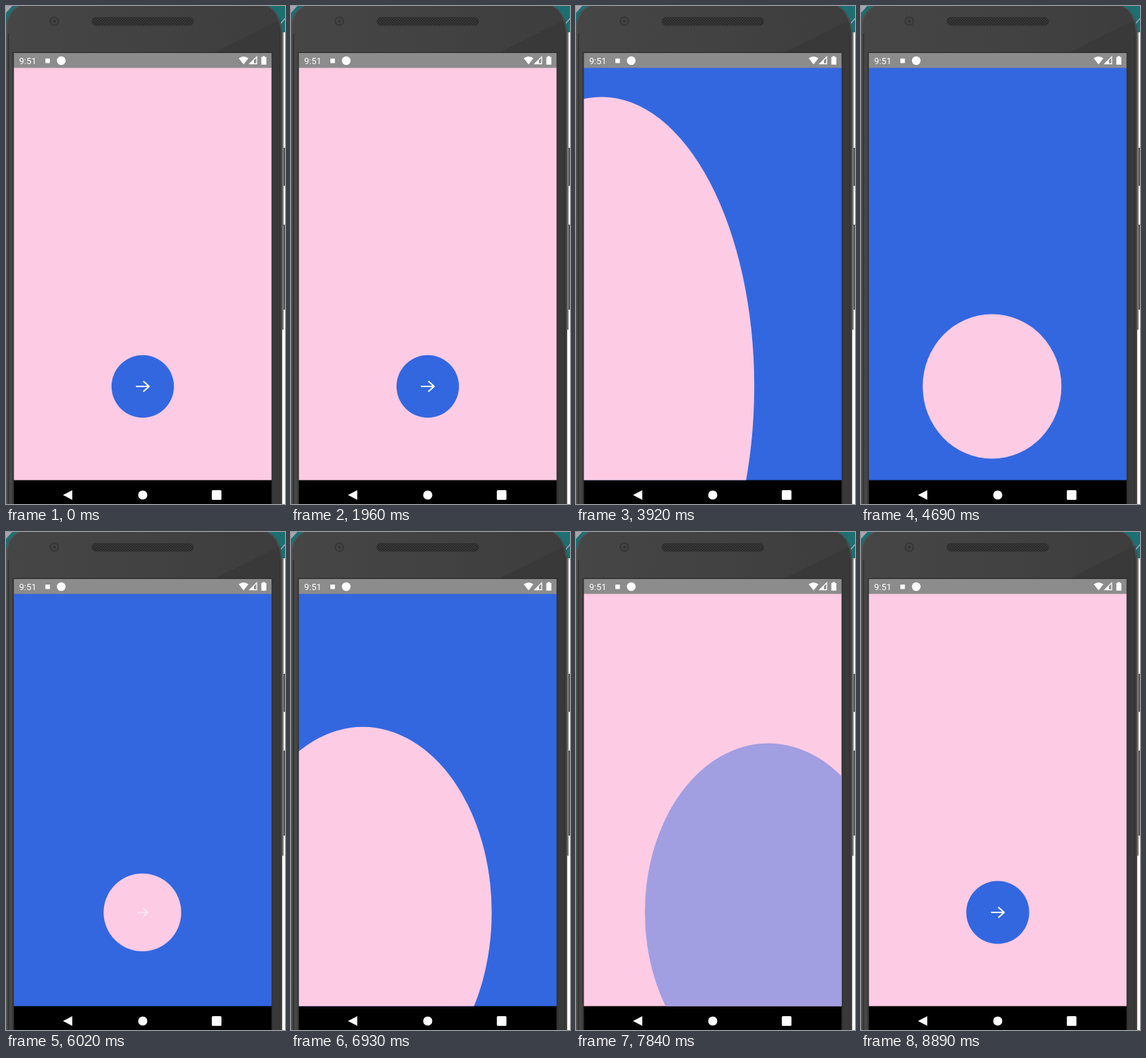
These frames come from a looping animation (404x720 px, 8.96 s). An HTML page:

```html
<!DOCTYPE html>
<html lang="en">
<head>
<meta charset="utf-8">
<title>Flip transition</title>
<style>
  html, body { margin: 0; width: 100%; height: 100%; overflow: hidden; background: #fff; }
  svg { display: block; width: 404px; height: 720px; }
  text { font: 13px Roboto, sans-serif; fill: #fff; }
</style>
</head>
<body>
<svg viewBox="0 0 404 720">
  <defs>
    <clipPath id="screen"><rect x="11.5" y="89.5" width="373" height="596"/></clipPath>
    <linearGradient id="body" x1="0" y1="0" x2="1" y2="0">
      <stop offset="0" stop-color="#464646"/>
      <stop offset=".5" stop-color="#424242"/>
      <stop offset="1" stop-color="#3d3d3d"/>
    </linearGradient>
    <pattern id="mesh" width="4" height="4" patternUnits="userSpaceOnUse">
      <rect width="4" height="4" fill="#383838"/>
      <circle cx="1" cy="1" r=".9" fill="#222"/>
      <circle cx="3" cy="3" r=".9" fill="#222"/>
    </pattern>
  </defs>

  <!-- desktop behind the phone -->
  <rect width="404" height="38" fill="#1d6f72"/>
  <path d="M398 25l6-7" stroke="#9aa5b5" stroke-width="1.5"/>
  <path d="M0 10L9 0H0z" fill="#a9a4ad"/>
  <path d="M401 205h3v55h-3zM401 316h3v123h-3z" fill="#565656"/>
  <path d="M400 38h2v430h-2z" fill="#7a7a7a"/>

  <!-- phone -->
  <path d="M0 720V26Q3 8 18 0H380Q397 8 400 38V720z" fill="url(#body)"/>
  <path d="M300 68L397 20L400 38V720H384V68z" fill="#393939"/>
  <path d="M1 720V26Q4 8 19 0M399 720V38Q396 8 379 0" fill="none" stroke="#5c5c5c"/>
  <path d="M3.5 720V40M396.5 720V40" stroke="#343434" stroke-width="2"/>
  <path d="M10.5 720V67.5H385.5V720" fill="none" stroke="#323232" stroke-width="2"/>
  <circle cx="70" cy="22" r="7" fill="#383838"/>
  <circle cx="70" cy="22" r="4.5" fill="#454648"/>
  <circle cx="70" cy="22" r="2.5" fill="#353739"/>
  <rect x="124.5" y="16.5" width="147" height="11.5" rx="5.5" fill="url(#mesh)" stroke="#303030"/>

  <!-- status bar -->
  <rect x="11.5" y="68" width="373" height="22" fill="#8c8c8c"/>
  <text x="19" y="84">9:51</text>
  <rect x="57" y="76" width="6.5" height="6.5" fill="#fff"/>
  <circle cx="80" cy="79" r="6.3" fill="#fff"/>
  <path d="M337 75.5Q344 70.5 351 75.5L344 84.5z" fill="#fff"/>
  <path d="M353 83.5L363 73.5V83.5z" fill="none" stroke="#fff" stroke-width="1.3"/>
  <path d="M352.5 84L359 77.5V84z" fill="#fff"/>
  <path d="M371.5 72.5h3.5v1.3h2v11h-7.3v-11h1.8z" fill="#fff"/>

  <!-- navigation bar -->
  <rect x="11.5" y="685" width="373" height="35" fill="#000"/>
  <path d="M82.5 707L96 700V714z" fill="#fff"/>
  <circle cx="198" cy="707" r="6.6" fill="#fff"/>
  <rect x="298" y="700" width="14" height="14" rx="1.5" fill="#fff"/>

  <!-- app -->
  <g clip-path="url(#screen)">
    <rect id="bg" x="11" y="89" width="374" height="598"/>
    <ellipse id="disc" cy="550"/>
    <path id="arrow" d="M-9.2 0H9M1.2-7L9 0L1.2 7" fill="none" stroke="#fff"
          stroke-width="2.1" stroke-linecap="round" stroke-linejoin="round"/>
  </g>
</svg>
<script>
const LOOP = 8960, STEP = 70;
const OUT = { start: 2080, span: 3200 }, BACK = { start: 5790, span: 3140 };
const CX = 198, CY = 550, RADIUS = 45.2, DEPTH = 367.5, GROWTH = 7;
const PINK = [253, 203, 228], BLUE = [51, 103, 224];
const [bg, disc, arrow] = ['bg', 'disc', 'arrow'].map(id => document.getElementById(id));

const clamp = v => Math.min(1, Math.max(0, v));
const mix = (a, b, k) => `rgb(${a.map((v, i) => Math.round(v + (b[i] - v) * k))})`;

// cubic-bezier(.42, 0, 1, 1), solved by bisection
function easeIn(x) {
  let lo = 0, hi = 1;
  for (let i = 0; i < 30; i++) {
    const u = (lo + hi) / 2, v = 1 - u;
    if (1.26 * u * v * v + 3 * u * u * v + u ** 3 < x) lo = u; else hi = u;
  }
  return lo * lo * (3 - 2 * lo);
}
const easeInOut = x => x < .5 ? easeIn(2 * x) / 2 : 1 - easeIn(2 - 2 * x) / 2;
const flip = (t, { start, span }) => easeInOut(clamp((t - start) / span));

function draw(t) {
  const p = flip(t, OUT) - flip(t, BACK);
  const late = p > .5;
  const angle = Math.PI * p;
  const scale = 1 + GROWTH * (1 - Math.abs(2 * p - 1));

  // a disc turned about its vertical axis, seen in perspective, is an ellipse
  const r = RADIUS * scale;
  const e = r * Math.sin(angle) / DEPTH;
  const w = r * Math.cos(angle) / (1 - e * e);
  disc.setAttribute('cx', CX + e * w);
  disc.setAttribute('rx', Math.abs(w));
  disc.setAttribute('ry', r / Math.sqrt(1 - e * e));
  disc.setAttribute('fill', mix(BLUE, PINK, clamp(2 * p)));
  bg.setAttribute('fill', mix(PINK, BLUE, late ? 1 : 0));

  const shown = clamp(1 - 20 * Math.min(p, 1 - p));
  arrow.setAttribute('transform', `translate(${CX + .2} ${CY}) scale(${scale * shown})`);
  arrow.setAttribute('opacity', shown);
}

function tick(now) {
  draw(Math.floor((now + 4) % LOOP / STEP) * STEP);
  requestAnimationFrame(tick);
}
draw(0);
requestAnimationFrame(tick);
</script>
</body>
</html>
```
